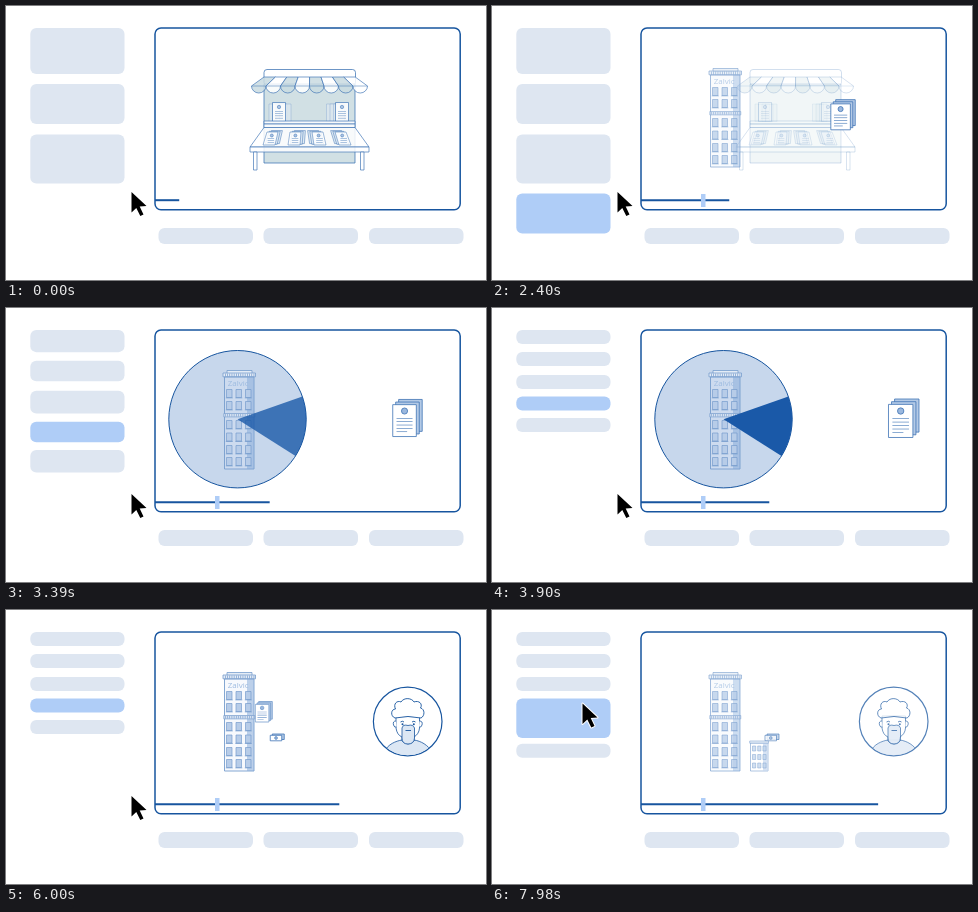
Recreate the animation shown at these times as an HTML page with a canvas. Size 480 by 274 pixels, loop 8 s.

```html
<!DOCTYPE html>
<html lang="en">
<head>
<meta charset="utf-8">
<style>
html, body { margin: 0; width: 100%; height: 100%; overflow: hidden; background: #fff; }
canvas { display: block; width: 480px; height: 274px; }
</style>
</head>
<body>
<canvas id="stage"></canvas>
<script>
const LOOP = 8000;
const NAVY = '#17559f', LINE = '#3f74b5', SOFT = '#779dcd', PALE = '#dee6f1', SKY = '#afcdf7';
const canvas = document.getElementById('stage');
const ctx = canvas.getContext('2d');
const dpr = window.devicePixelRatio || 1;
canvas.width = 480 * dpr;
canvas.height = 274 * dpr;

const ramp = (t, a, b) => Math.min(1, Math.max(0, (t - a) / (b - a)));
const mix = (a, b, p) => a + (b - a) * p;
const sine = p => (1 - Math.cos(Math.PI * p)) / 2;
const cubic = p => p < .5 ? 4 * p ** 3 : 1 - 4 * (1 - p) ** 3;

function paint(fill, stroke, width = .8) {
  if (fill) { ctx.fillStyle = fill; ctx.fill(); }
  if (stroke) { ctx.strokeStyle = stroke; ctx.lineWidth = width; ctx.stroke(); }
}
function box(x, y, w, h, fill, stroke, width, r = 0) {
  ctx.beginPath();
  ctx.roundRect(x, y, w, h, r);
  paint(fill, stroke, width);
}
function poly(points, fill, stroke, width) {
  ctx.beginPath();
  points.forEach(([x, y]) => ctx.lineTo(x, y));
  ctx.closePath();
  paint(fill, stroke, width);
}
function disc(x, y, r, fill, stroke, width) {
  ctx.beginPath();
  ctx.arc(x, y, r, 0, 7);
  paint(fill, stroke, width);
}
function shape(d, fill, stroke, width) {
  const path = new Path2D(d);
  if (fill) { ctx.fillStyle = fill; ctx.fill(path); }
  if (stroke) { ctx.strokeStyle = stroke; ctx.lineWidth = width || .8; ctx.stroke(path); }
}
function faded(alpha, draw) {
  if (alpha <= 0) return;
  ctx.save();
  ctx.globalAlpha *= alpha;
  draw();
  ctx.restore();
}

// A stack of three pages; the front one sits at the lower left.
function pages(x, y, w, h, color = LINE) {
  const pw = w * .8, ph = h * .86;
  for (const i of [2, 1, 0])
    box(x + i * w * .1, y + (2 - i * 1) * h * .07, pw, ph, i ? '#b4cae6' : '#fff', color, .8);
  const top = y + h * .14;
  disc(x + pw / 2, top + ph * .2, pw * .13, '#9bb8de', color, .8);
  for (let i = 0; i < 5; i++)
    box(x + pw * .16, top + ph * (.42 + i * .105), pw * (i < 4 ? .68 : .45), .6, color);
}

function stall() {
  const tint = '#c9dbe0';
  box(258, 63.5, 91.5, 16, '#fff', LINE, .9, 3);
  box(258, 78, 91, 79, tint, LINE, .9);
  for (const [x, far] of [[266.5, 263], [329.5, 320.5]]) {
    for (let i = 0; i < 3; i++) box(far + i * 3.5, 98, 11, 17.5, '#dbe7ee', '#86a8d2', .5);
    if (x < 300) box(273.5, 98, 11.5, 17.5, '#dbe7ee', '#86a8d2', .5);
    box(x, 96.5, 13, 19, '#fff', LINE);
    disc(x + 6.5, 101, 1.7, '#9bb8de', LINE, .6);
    for (let i = 0; i < 4; i++) box(x + 2.5, 105 + i * 2.3, 8, .5, LINE);
  }
  box(258, 115, 91, 3, '#fff', LINE);
  box(258, 118, 91, 3.5, '#fff', LINE);
  poly([[258, 121.5], [349, 121.5], [363, 141], [244, 141]], '#fff', LINE);
  box(244, 141, 119, 5, '#fff', LINE);
  for (const x of [247.5, 354.5]) box(x, 146, 3.5, 18, '#fff', LINE);
  for (const [x, lean] of [[257, 4], [282, 2], [308, -2], [333, -4]]) {
    for (let i = 2; i >= 0; i--) {
      const l = x + i * 2.2 * Math.sign(lean), y = 126 - i * .7;
      poly([[l + lean, y], [l + lean + 11, y], [l + 12, y + 13], [l, y + 13]], i ? '#dce7f2' : '#fff', LINE, .6);
    }
    disc(x + 6 + lean * .7, 129.5, 1.5, '#9bb8de', LINE, .6);
    for (let i = 0; i < 3; i++) box(x + 3 + lean * .4, 132.5 + i * 1.8, 6.5, .5, LINE);
  }
  // Awning: eight flared stripes, each ending in a scallop.
  for (let i = 0; i < 8; i++) {
    const top = k => 258 + k * 11.4, low = k => 245.5 + k * 14.5;
    ctx.beginPath();
    ctx.moveTo(top(i), 71);
    ctx.lineTo(top(i + 1), 71);
    ctx.lineTo(low(i + 1), 80);
    ctx.ellipse(low(i + .5), 80, 7.25, 7, 0, 0, Math.PI);
    ctx.closePath();
    paint(i % 2 ? '#fff' : tint, LINE);
  }
  ctx.beginPath();
  ctx.moveTo(245.5, 80);
  ctx.lineTo(361.5, 80);
  paint(null, LINE, .6);
}

function tower() {
  box(221, 62.5, 25, 3, '#e4ecf6', SOFT);
  box(217, 65, 32.5, 3.8, '#e4ecf6', SOFT);
  for (let x = 219; x < 249; x += 2.2) box(x, 65.5, .7, 3, SOFT);
  box(218.5, 69, 29.5, 92, 'rgba(222,232,245,.25)', SOFT, .9);
  box(241, 69, 7, 92, 'rgba(130,168,216,.5)');
  ctx.fillStyle = '#9dbbe0';
  ctx.font = '8px "Open Sans", sans-serif';
  ctx.textAlign = 'center';
  ctx.fillText('Zalvic', 232.2, 78);
  for (const y of [81.5, 93.5, 112.5, 125, 137.5, 149.5])
    for (const x of [220.5, 230, 239.5]) {
      box(x, y, 5.5, 8, '#b7cce8', SOFT, .7);
      box(x - .7, y + 8, 7, .8, SOFT);
    }
  box(217.8, 105.5, 31, 3.4, '#d5e1f1', SOFT, .7);
  for (let x = 219; x < 248; x += 2.2) box(x, 106, .6, 2.6, SOFT);
}

function shop() {
  box(258.5, 133, 17.5, 28, '#fff', SOFT);
  box(271, 133, 5, 28, '#c9daef');
  box(257.7, 131, 18.8, 2.2, '#e4ecf6', SOFT, .7);
  for (const y of [136, 144.5, 153])
    for (const x of [260.5, 265.7, 270.9]) box(x, y, 3.2, 5, '#c2d4ec', SOFT, .6);
}

function card(x) {
  box(x - 5, 124, 12, 5.5, '#b4cae6', LINE, .8);
  box(x - 7, 125.3, 11.5, 5.5, '#fff', LINE, .8);
  disc(x - 1.2, 128, 1.4, '#9bb8de', LINE, .6);
}

function reader() {
  disc(401.7, 111.5, 34.3, '#fff', NAVY, 1.2);
  ctx.save();
  disc(401.7, 111.5, 33.7);
  ctx.clip();
  shape('M378 142C382 134 390 131 396 130H408C415 131 422 135 426 142V150H378Z', '#dce7f4', NAVY);
  ctx.restore();
  shape('M390 106V118Q391 125 396 127V131Q402 137 408 131V127Q413 124 413.500 118V106Z', '#fff', NAVY);
  shape('M390 111Q386.500 111 387.500 115Q388.500 118 390.500 117M413.500 111Q417 111 416 115Q415 118 413 117', '#fff', NAVY);
  shape('M389 108C384 106 385 99 389.500 99C387 94 391 90 395 92C398 87 406 88 408 92C413 90 417 94 414.500 98C419 99 419 106 415 108Q402 105 389 108Z', '#fff', NAVY, .9);
  shape('M396 118Q397 114 402 115.500Q407 114 408.500 118V128Q408 134 402 134Q396 134 396 128Z', '#dce7f4', NAVY);
  shape('M399.500 120.500H405M394.500 112Q396.500 110.500 398 112M406 112Q408 110.500 409.500 112', null, NAVY, .9);
  disc(396.5, 114.3, 1, NAVY);
  disc(407.8, 114.3, 1, NAVY);
}

function wedge(r) {
  ctx.beginPath();
  ctx.moveTo(231.5, 111.2);
  ctx.arc(231.5, 111.2, r, -.335, .565);
  ctx.closePath();
  paint('#1a59a8');
}

function sidebar(t) {
  const shrink = cubic(ramp(t, 2790, 3790));
  const grow = cubic(ramp(t, 6950, 7650));
  // [start y, start height, end y]
  const blocks = [[22, 46, 22], [78, 40, 44], [128.5, 49, 67], [187.5, 40, 88.5], [235.5, 48, 110]];
  blocks.forEach(([y0, h0, y1], i) => {
    const y = mix(y0, y1, shrink) + (i === 4 ? 23.8 * grow : 0);
    const h = mix(h0, 14, shrink) + (i === 3 ? 25.5 * grow : 0);
    const alpha = i < 3 ? 1 : i === 3 ? ramp(t, 1400, 1500) : ramp(t, 2750, 2900);
    faded(alpha, () => box(24.3, y, 94.2, h, i === 3 ? SKY : PALE, null, 0, 6));
  });
}

function cursor(t) {
  const p = cubic(ramp(t, 6230, 6880));
  ctx.save();
  ctx.translate(mix(125.5, 90.5, p), mix(186, 93.5, p));
  ctx.lineJoin = 'round';
  shape('M0 0V20.500L4.800 16L8.800 24L12 22.400L8.200 14.600L15 14Z', '#000', '#fff', 2);
  shape('M0 0V20.500L4.800 16L8.800 24L12 22.400L8.200 14.600L15 14Z', '#000');
  ctx.restore();
}

function scene(t) {
  const pie = ramp(t, 2850, 3200) * (1 - ramp(t, 5250, 5600));
  const ending = 1 - ramp(t, 7800, 8500);

  faded(mix(.85, 1, ramp(t, 0, 200)) * (1 - ramp(t, 1950, 2560)), stall);
  faded(pie, () => disc(231.5, 111.2, 68.7, '#c7d7ec', NAVY, 1));

  // The small stack slides out from behind the tower and back.
  const out = sine(ramp(t, 4750, 5400)) - sine(ramp(t, 6550, 7250));
  ctx.save();
  ctx.beginPath();
  ctx.rect(248.5, 0, 200, 274);
  ctx.clip();
  faded(ending, () => {
    if (out > 0) pages(mix(231, 249.3, out), 91.5, 17, 20.5, SOFT);
    const go = cubic(ramp(t, 5507, 6770)), back = cubic(ramp(t, 6950, 7900));
    if (go > 0) card(mix(mix(240, 370.5, go), 280, back));
  });
  ctx.restore();

  faded(ramp(t, 2000, 2550) * ending, tower);
  faded(ramp(t, 7350, 7750) * ending, shop);
  faded(pie * mix(.6, 1, ramp(t, 3200, 3600)), () => wedge(mix(68.7, 89.5, ramp(t, 4860, 4980))));

  const move = sine(ramp(t, 1666, 3916));
  const w = mix(22.5, 30.5, move);
  faded(ramp(t, 1650, 1900) * (1 - ramp(t, 4200, 4800)),
    () => pages(mix(343, 427, move) - w, mix(94.5, 91, move), w, mix(27.5, 38.5, move)));

  faded(ramp(t, 4830, 5180) * ending, reader);
}

function draw(t) {
  ctx.setTransform(dpr, 0, 0, dpr, 0, 0);
  ctx.fillStyle = '#fff';
  ctx.fillRect(0, 0, 480, 274);
  sidebar(t);
  for (const x of [152.5, 257.5, 363]) box(x, 222, 94.5, 16, PALE, null, 0, 6);
  scene(t);
  box(149, 22, 305.2, 181.8, null, NAVY, 1.5, 6);
  box(149, 193.2, 24.2 + t * .02668, 2, NAVY);
  faded(ramp(t, 1400, 1500), () => box(209, 188, 4.5, 13, SKY));
  cursor(t);
}

function tick() {
  draw(performance.now() % LOOP);
  requestAnimationFrame(tick);
}
tick();
</script>
</body>
</html>
```
